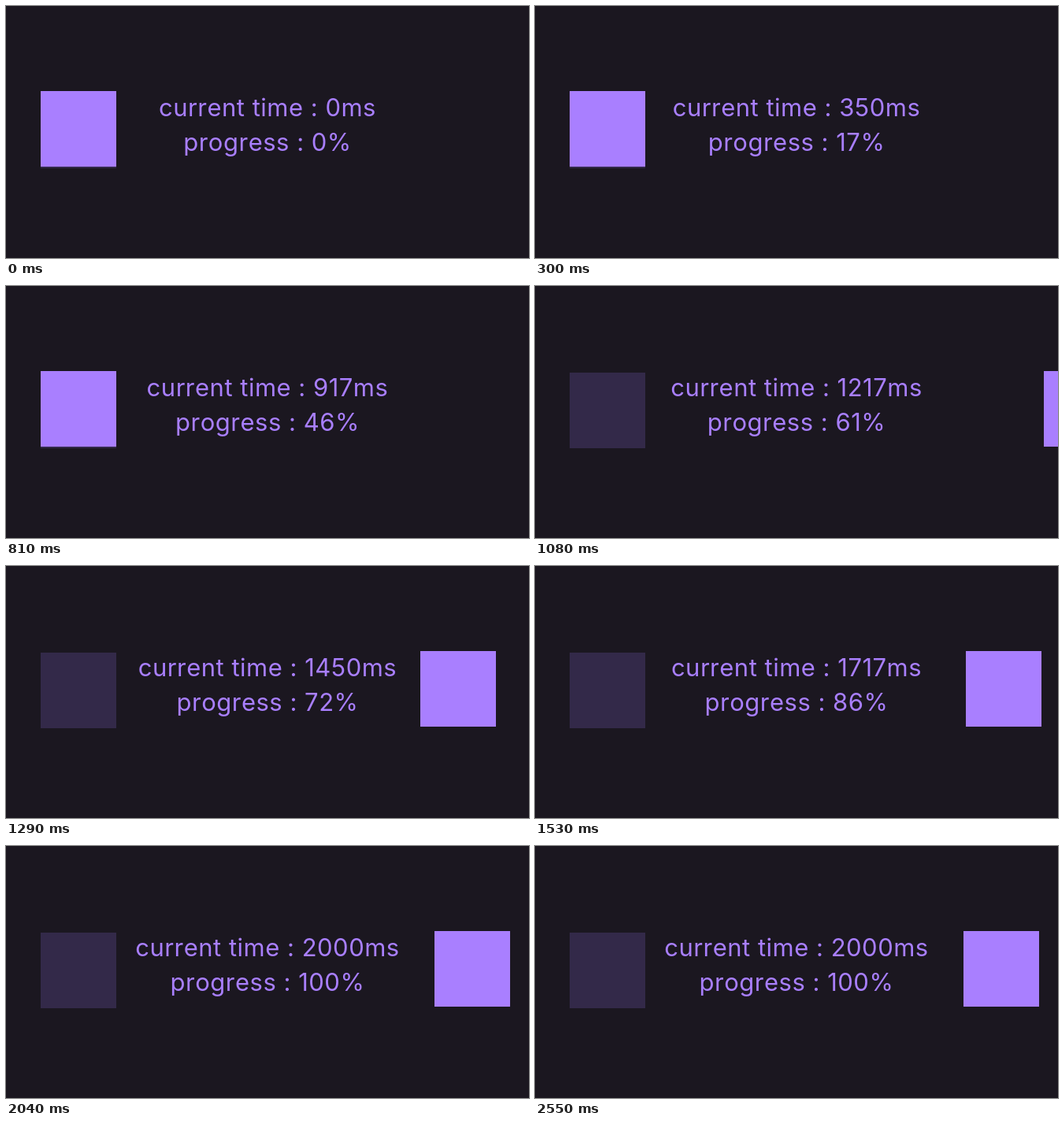
Recreate the animation shown at these times as an HTML page. Size 664 by 320 pixels, loop 2.61 s.

```html
<!DOCTYPE html>
<html lang="en">
<head>
<meta charset="utf-8">
<title>Progress</title>
<style>
  html, body { margin: 0; width: 100%; height: 100%; overflow: hidden; background: #1b1720; }
  .stage { position: relative; width: 664px; height: 320px; overflow: hidden; }
  .box { position: absolute; left: 44px; width: 96px; height: 96px; }
  .ghost { top: 110px; background: #332949; }
  .mover { top: 108px; background: #a97fff; }
  .log {
    position: absolute; top: 107px; left: 0; width: 100%;
    font: 400 31px/44px Inter, sans-serif;
    font-optical-sizing: none;
    font-kerning: none;
    letter-spacing: 0.5px;
    text-align: center; white-space: pre; color: #a97fff;
  }
</style>
</head>
<body>
<div class="stage">
  <div class="box ghost"></div>
  <div class="box mover" id="mover"></div>
  <div class="log"><div id="time"></div><div id="progress"></div></div>
</div>
<script>
  const LOOP = 2610, STEP = 30, TICK = 100 / 3;
  const DURATION = 2000, DELAY = 1000, DISTANCE = 500;
  const mover = document.getElementById('mover');
  const time = document.getElementById('time');
  const progress = document.getElementById('progress');

  // Elastic ease-out, amplitude 1, period 0.5
  function elastic(t) {
    if (t <= 0) return 0;
    if (t >= 1) return 1;
    return 1 + 2 ** (-10 * t) * Math.sin((t - 0.125) * 4 * Math.PI);
  }

  function render(ms) {
    const step = Math.floor((ms % LOOP) / STEP);
    // The clock runs in 1/30 s ticks, sampled just short of the half tick
    const t = step ? Math.min(DURATION, (step + 0.5) * TICK - 0.02) : 0;
    const x = Math.round(DISTANCE * elastic((t - DELAY) / (DURATION - DELAY)));
    mover.style.transform = `translateX(${x}px)`;
    time.textContent = `current time : ${Math.round(t)}ms`;
    progress.textContent = `progress : ${Math.round(t / DURATION * 100)}%`;
  }

  const start = performance.now();
  function loop() {
    render(performance.now() - start);
    requestAnimationFrame(loop);
  }
  loop();
</script>
</body>
</html>
```
